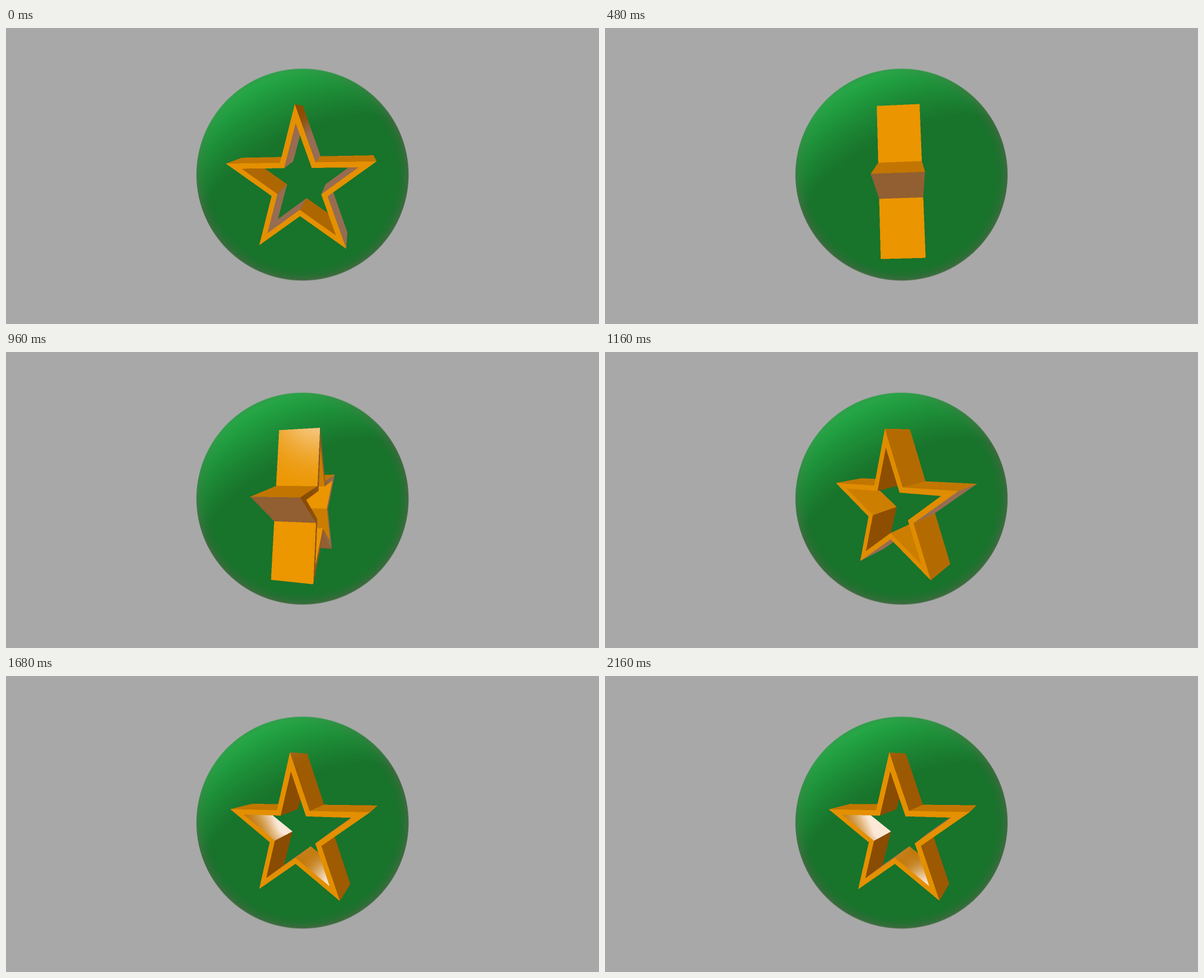
An HTML page with a canvas that plays this animation: 1024 by 512 pixels, repeating every 2.2 s.

```html
<!DOCTYPE html>
<html lang="en">
<head>
<meta charset="utf-8">
<title>Spinning star</title>
<style>
html, body { margin: 0; width: 100%; height: 100%; overflow: hidden; background: #a8a8a8; }
canvas { display: block; width: 100vw; height: 100vh; }
</style>
</head>
<body>
<canvas id="stage" width="1024" height="512"></canvas>
<script>
const ctx = document.getElementById('stage').getContext('2d');
const LOOP = 2200, STEP = 40;

// Camera: raised, pitched down and slightly rolled
const DIST = 3.85, FOCAL = 490, CX = 512, CY = 266.8;
const SP = 0.22, CP = Math.sqrt(1 - SP * SP);
const ROLL = 2.5 * Math.PI / 180, SR = Math.sin(ROLL), CR = Math.cos(ROLL);
const EYE = [0, DIST * SP, DIST * CP];

const START = 0.187, TURN = 0.1, HALF = 0.274, NOTCH = 0.382, HOLE = 0.78, TALL = 1.015;
// [step, turns made so far]: a slow start, then an uneven spin
const PACE = [[0, 0], [3, 3], [4, 3], [8, 7], [17, 30], [24, 46], [34, 71], [42, 92], [54, 123.6]];

const BOX = { x: 352, y: 106, size: 320, scale: 2 };
const N = BOX.size * BOX.scale;

const clamp = v => Math.max(0, Math.min(1, v));
const mix = (a, b, t) => a + (b - a) * t;
const dot = (a, b) => a[0] * b[0] + a[1] * b[1] + a[2] * b[2];
const smooth = (a, b, v) => { const t = clamp((v - a) / (b - a)); return t * t * (3 - 2 * t); };
const unit = v => { const l = Math.hypot(...v); return v.map(c => c / l); };

function makeLayer(size) {
  const c = document.createElement('canvas');
  c.width = c.height = size;
  const g = c.getContext('2d');
  return { c, g, img: g.createImageData(size, size) };
}

// ---- Ball ----
const BALL = { x: 512, y: 253.6, r: 183.2 };
function makeBall() {
  const size = 372, layer = makeLayer(size), light = unit([-0.4, 0.8, -0.35]);
  const base = [24, 115, 43], lit = [35, 171, 70], rim = [100, 98, 84];
  for (let j = 0; j < size; j++) for (let i = 0; i < size; i++) {
    const dx = i + 0.5 - size / 2, dy = j + 0.5 - size / 2, d = Math.hypot(dx, dy);
    if (d > BALL.r + 1) continue;
    const k = Math.max(BALL.r, d), nx = dx / k, ny = -dy / k;
    const nz = Math.sqrt(Math.max(0, 1 - nx * nx - ny * ny));
    const glow = clamp(dot([nx, ny, nz], light) / 0.78);
    const edge = 0.55 * (1 - smooth(0, 0.5, nz)) * (1 - 0.65 * glow);
    const o = (j * size + i) * 4;
    for (let c = 0; c < 3; c++)
      layer.img.data[o + c] = mix(mix(base[c], lit[c], glow), rim[c], edge);
    layer.img.data[o + 3] = 255 * clamp(BALL.r + 0.5 - d);
  }
  layer.g.putImageData(layer.img, 0, 0);
  return layer.c;
}

// ---- Star model ----
function outline(scale) {
  return Array.from({ length: 10 }, (_, i) => {
    const a = Math.PI / 2 + i * Math.PI / 5, r = scale * (i % 2 ? NOTCH : 1);
    return [r * Math.cos(a), TALL * r * Math.sin(a)];
  });
}

function makeFaces() {
  const out = outline(1), hole = outline(HOLE), faces = [];
  const at = (p, z) => [p[0], p[1], z];
  for (let i = 0; i < 10; i++) {
    const j = (i + 1) % 10, a = out[i], b = out[j], c = hole[j], d = hole[i];
    const n = unit([b[1] - a[1], a[0] - b[0], 0]);
    for (const s of [1, -1])
      faces.push({ n: [0, 0, s], pts: [a, b, c, d].map(p => at(p, s * HALF)) });
    faces.push({ n, pts: [at(a, HALF), at(b, HALF), at(b, -HALF), at(a, -HALF)] });
    faces.push({ n: n.map(v => -v), pts: [at(d, HALF), at(c, HALF), at(c, -HALF), at(d, -HALF)] });
  }
  return faces;
}

// ---- Shading ----
const KEY = unit([-0.2, 0.55, 0.8]);
const DARK = [138, 76, 2], BRIGHT = [236, 150, 0], GRAY = [150, 108, 82], WHITE = [252, 232, 215];
const GLINTS = [
  { dir: unit([-0.42, 0.66, 0.62]), pow: 80, amp: 0.75 },
  { dir: unit([-0.945, 0.025, -0.323]), pow: 370, amp: 0.6 },
  { dir: unit([-0.899, 0.23, -0.372]), pow: 400, amp: 0.75 },
  { dir: unit([0.33, 0.49, -0.81]), pow: 400, amp: 1 },
  { dir: unit([0.42, 0.48, -0.77]), pow: 500, amp: 1 },
  { dir: unit([0.62, 0.385, -0.685]), pow: 400, amp: 1 }
];

function shade(n, diffuse, x, y, z, data, o) {
  let vx = EYE[0] - x, vy = EYE[1] - y, vz = EYE[2] - z;
  const l = Math.hypot(vx, vy, vz);
  vx /= l; vy /= l; vz /= l;
  const nv = n[0] * vx + n[1] * vy + n[2] * vz;
  const r = [2 * nv * n[0] - vx, 2 * nv * n[1] - vy, 2 * nv * n[2] - vz];
  // Gray sheen at grazing angles, and bounce on faces that look down
  const sheen = (1 - smooth(0.17, 0.27, nv)) * (1 - smooth(0.03, 0.12, r[1]));
  const gray = Math.max(sheen, 0.6 * smooth(0.5, 0.8, -n[1]));
  let shine = 0;
  for (const g of GLINTS) {
    const d = dot(r, g.dir);
    if (d > 0.9) shine += g.amp * Math.pow(d, g.pow);
  }
  shine = clamp(shine);
  for (let c = 0; c < 3; c++)
    data[o + c] = mix(mix(mix(DARK[c], BRIGHT[c], diffuse), GRAY[c], gray), WHITE[c], shine);
  data[o + 3] = 255;
}

// ---- Rasteriser ----
const star = makeLayer(N), depth = new Float32Array(N * N);

function project([x, y, z]) {
  const zc = DIST - y * SP - z * CP, k = FOCAL / zc;
  const dx = x * k, dy = (z * SP - y * CP) * k;
  return {
    x: (CX + dx * CR + dy * SR - BOX.x) * BOX.scale,
    y: (CY + dy * CR - dx * SR - BOX.y) * BOX.scale,
    w: 1 / zc, p: [x / zc, y / zc, z / zc]
  };
}

function fillTriangle(a, b, c, n, diffuse) {
  const area = (b.x - a.x) * (c.y - a.y) - (b.y - a.y) * (c.x - a.x);
  if (Math.abs(area) < 1e-6) return;
  const lo = k => Math.max(0, Math.floor(Math.min(a[k], b[k], c[k])));
  const hi = k => Math.min(N - 1, Math.ceil(Math.max(a[k], b[k], c[k])));
  const x0 = lo('x'), x1 = hi('x'), y0 = lo('y'), y1 = hi('y');
  for (let j = y0; j <= y1; j++) for (let i = x0; i <= x1; i++) {
    const px = i + 0.5, py = j + 0.5;
    const u = ((b.x - px) * (c.y - py) - (b.y - py) * (c.x - px)) / area;
    const v = ((c.x - px) * (a.y - py) - (c.y - py) * (a.x - px)) / area;
    const t = 1 - u - v;
    if (u < 0 || v < 0 || t < 0) continue;
    const w = u * a.w + v * b.w + t * c.w, o = j * N + i;
    if (w <= depth[o]) continue;
    depth[o] = w;
    const q = k => (u * a.p[k] + v * b.p[k] + t * c.p[k]) / w;
    shade(n, diffuse, q(0), q(1), q(2), star.img.data, o * 4);
  }
}

function renderStar(angle) {
  const s = Math.sin(angle), c = Math.cos(angle);
  const spin = ([x, y, z]) => [x * c - z * s, y, x * s + z * c];
  star.img.data.fill(0);
  depth.fill(0);
  for (const f of faces) {
    const n = spin(f.n), pts = f.pts.map(spin);
    if (dot(n, EYE.map((e, i) => e - pts[0][i])) <= 0) continue;
    const [p, q, r, t] = pts.map(project), diffuse = smooth(0.02, 1, dot(n, KEY));
    fillTriangle(p, q, r, n, diffuse);
    fillTriangle(p, r, t, n, diffuse);
  }
  star.g.putImageData(star.img, 0, 0);
}

// ---- Playback ----
const ball = makeBall(), faces = makeFaces();

function turnsAt(step) {
  const i = PACE.findIndex(p => p[0] >= step);
  if (i < 1) return 0;
  const [s0, t0] = PACE[i - 1], [s1, t1] = PACE[i];
  return mix(t0, t1, (step - s0) / (s1 - s0));
}

function draw(step) {
  renderStar(START - TURN * turnsAt(step));
  ctx.fillStyle = '#a8a8a8';
  ctx.fillRect(0, 0, 1024, 512);
  ctx.drawImage(ball, BALL.x - ball.width / 2, BALL.y - ball.height / 2);
  ctx.drawImage(star.c, BOX.x, BOX.y, BOX.size, BOX.size);
}

const begin = performance.now();
let shown = -1;
function loop() {
  const step = Math.floor(((performance.now() - begin) % LOOP) / STEP);
  if (step !== shown) draw(shown = step);
  requestAnimationFrame(loop);
}
loop();
</script>
</body>
</html>
```
